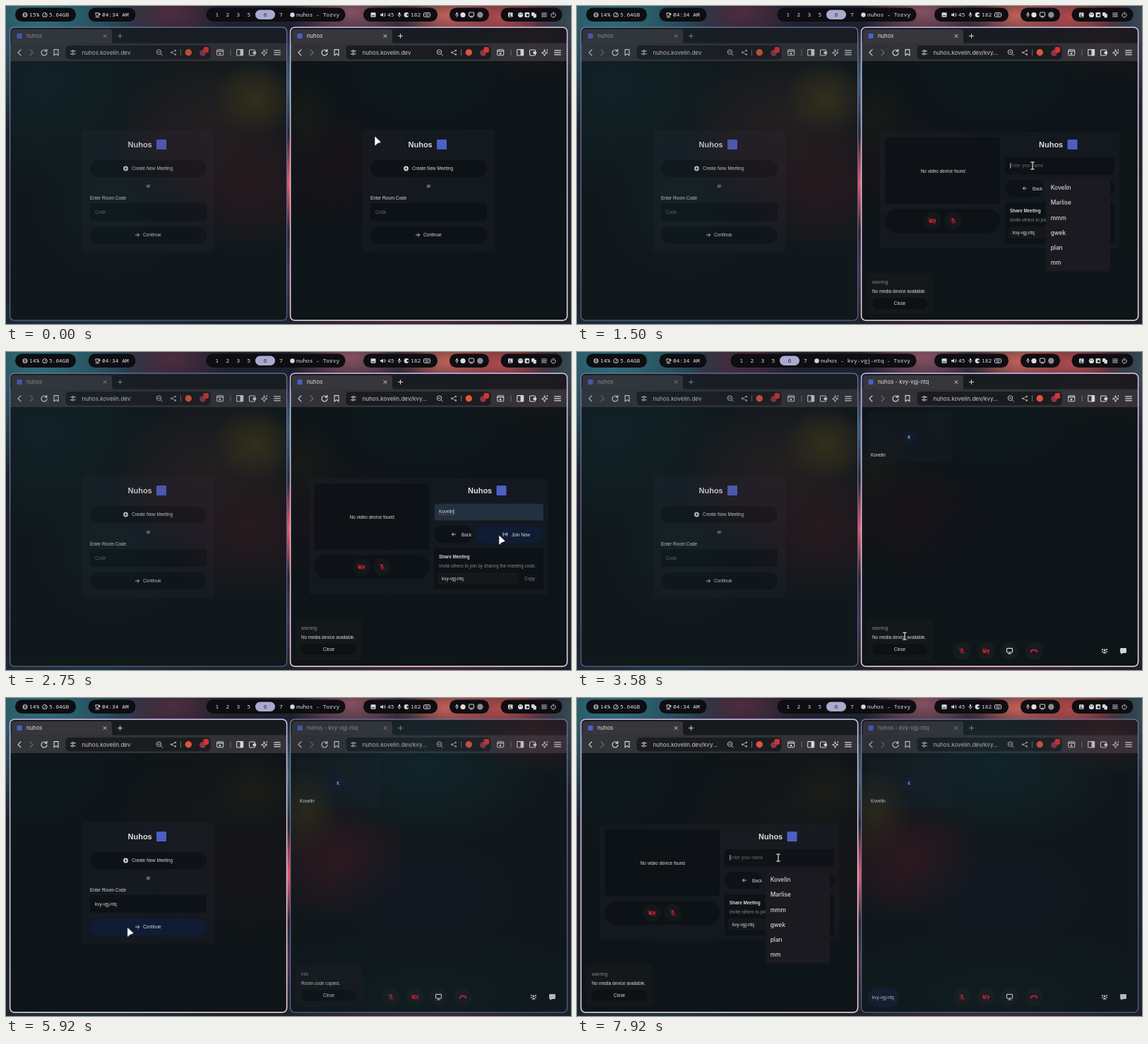
These frames come from a looping animation (800 by 450 pixels, 8 s). An HTML page:

```html
<!DOCTYPE html>
<html lang="en">
<head>
<meta charset="utf-8">
<title>Two windows, one meeting</title>
<style>
html, body { margin: 0; width: 100%; height: 100%; overflow: hidden; background: #10161c; }
svg { display: block; width: 100vw; height: 100vh; }
text { white-space: pre; }
.mono { font: 500 7.85px "Noto Sans Mono", "DejaVu Sans Mono", monospace; fill: #e4e4ea; }
.tab { font: 400 7.7px Inter, sans-serif; fill: #e0e1e4; }
.url { font: 400 8.1px Inter, sans-serif; fill: #c9cbcf; }
.list { font: 500 8.3px Inter, sans-serif; fill: #d4d4d9; }
.page { font: 400 6.38px "Liberation Sans", Arial, sans-serif; fill: #d9dbdd; }
.soft { fill: #85898d; }
.faint { fill: #686c70; }
.bold { font-weight: 700; }
.brand { font: 700 11px "Liberation Sans", Arial, sans-serif; fill: #dcdde0; }
.mid { text-anchor: middle; }
</style>
</head>
<body>
<svg id="stage" viewBox="0 0 800 450" preserveAspectRatio="none"></svg>
<script>
const LOOP = 8000;
const APP = 'Nuhos', HOST = 'nuhos.kovelin.dev', USER = 'Kovelin', ROOM = 'kvy-vgj-ntq';
const NAMES = [USER, 'Marlise', 'mmm', 'gwek', 'plan', 'mm'];
const WHITE = '#d6d7da', RED = '#c3202f', BLUE = '#4c5fc4', NAVY = '#101c34';
const DARK = 'rgba(9,13,15,.55)', CARD = 'rgba(30,33,40,.45)';

const rect = (x, y, w, h, r, fill, more = '') =>
  `<rect x="${x}" y="${y}" width="${w}" height="${h}" rx="${r}" fill="${fill}" ${more}/>`;
const dot = (x, y, r, fill, more = '') => `<circle cx="${x}" cy="${y}" r="${r}" fill="${fill}" ${more}/>`;
const text = (x, y, s, cls, more = '') => `<text x="${x}" y="${y}" class="${cls}" ${more}>${s}</text>`;
const group = (id, body) => `<g id="${id}">${body}</g>`;
const line = (x, y, d, color = WHITE, w = 1) =>
  `<path transform="translate(${x} ${y})" d="${d}" fill="none" stroke="${color}" stroke-width="${w}" stroke-linecap="round" stroke-linejoin="round"/>`;
const solid = (x, y, d, color = WHITE) => `<path transform="translate(${x} ${y})" d="${d}" fill="${color}"/>`;

let glowCount = 0;
const glow = ([x, y, rx, ry, color, alpha = 1]) => {
  const id = 'glow' + glowCount++;
  return `<radialGradient id="${id}"><stop stop-color="${color}" stop-opacity="${alpha}"/>
    <stop offset=".5" stop-color="${color}" stop-opacity="${alpha * .55}"/>
    <stop offset="1" stop-color="${color}" stop-opacity="0"/></radialGradient>
    <ellipse cx="${x}" cy="${y}" rx="${rx}" ry="${ry}" fill="url(#${id})"/>`;
};

// Icons
const micOff = (x, y) => line(x, y, 'M0-2.6v2', RED, 2.6) +
  line(x, y, 'M-2.7 0a2.7 2.5 0 0 0 5.4 0M0 2.6v1.4M-4-4L4 4', RED, .9);
const camOff = (x, y) => rect(x - 4.5, y - 2.7, 6, 5.4, 1, RED) + solid(x, y, 'M2-1L4.8-2.7V2.7L2 1Z', RED) +
  line(x, y, 'M-4.5-4L4.5 4', '#40151b', 1.2) + line(x, y, 'M-5-3.6L4 4.4', RED, .8);
const screen = (x, y) => rect(x - 4, y - 3.6, 8, 5.6, .8, 'none', `stroke="${WHITE}" stroke-width="1.2"`) +
  line(x, y, 'M0 2v2M-2 4h4', WHITE, 1.1);
const hangUp = (x, y) => line(x, y, 'M-4 1.4V0Q0-2.6 4 0V1.4', RED, 2.2);
const people = (x, y) => dot(x, y - 1, 1.4, WHITE) + dot(x - 3, y - 2, 1.1, WHITE) + dot(x + 3, y - 2, 1.1, WHITE) +
  solid(x, y, 'M-2.6 3.5Q0-1 2.6 3.5ZM-4.6 1.6Q-3-1-1.6.6L-2.6 1.8ZM4.6 1.6Q3-1 1.6.6L2.6 1.8Z');
const chat = (x, y) => solid(x, y, 'M-3.4-4H3.4Q4.4-4 4.4-3V2Q4.4 3 3.4 3H-.5L-3 5V3H-3.4Q-4.4 3-4.4 2V-3Q-4.4-4-3.4-4Z');
const arrow = (x, y, dir) => line(x, y, `M${-2.6 * dir} 0H${2.6 * dir}M${.4 * dir}-2.2L${2.6 * dir} 0L${.4 * dir} 2.2`, WHITE, .9);

const brand = x => text(x, 200, APP, 'brand') + rect(x + 40.5, 189, 14, 14, 1, BLUE);

function topBar() {
  const pill = (x, w) => rect(x, 2.5, w, 19.5, 9.7, '#0d0d12');
  const label = (x, s, id) => text(x, 15.3, s, 'mono', id ? `id="${id}"` : '');
  const center = (id, dx, title) => group(id,
    pill(283.5 + dx, 197 - dx) +
    [1, 2, 3, 5].map((n, i) => label(296.5 + dx + i * 15, n)).join('') +
    rect(353 + dx, 5.5, 28, 13.5, 6.7, '#aaa9cf') +
    text(364.7 + dx, 15.3, 6, 'mono', 'style="fill:#20202c"') +
    label(387 + dx, 7) + dot(405.5 + dx, 12.5, 3.2, WHITE) + label(411 + dx, title));
  return [[13, 86], [116.5, 67], [506, 105], [628, 56], [700.5, 87]].map(p => pill(...p)).join('') +
    dot(27, 12.5, 2.8, 'none', `stroke="${WHITE}" stroke-width="1.1"`) + line(27, 12.5, 'M-1-.6V.6M1-.6V.6') +
    label(33, '15%', 'cpuHigh') + label(33, '14%', 'cpuLow') +
    line(55, 12.5, 'M-2.6 2.4A3.3 3.3 0 1 1 2.6 2.4ZM0 .6L1.5-1.2') + label(61, '5.64GB') +
    line(130, 12.5, 'M-2.8-2.6H1.4V.5Q1.2 1.6 0 1.6H-1.6Q-2.8 1.6-2.8.5ZM1.6-1.8H3V0H1.6M-3 3.3H2') + label(136, '04:34 AM') +
    center('barShort', 0, 'nuhos - Torvy') + center('barLong', -66, `nuhos - ${ROOM} - Torvy`) +
    rect(516.5, 9.3, 7, 6.4, 1, WHITE) + line(520, 12.8, 'M-1.8 1H1.8', '#15151b') +
    solid(533, 12.5, 'M-3-1.2H-1.2L1-3V3L-1.2 1.2H-3Z') + line(534, 12.5, 'M1.5-1.5Q2.8 0 1.5 1.5M2.5-2.4Q4.4 0 2.5 2.4', WHITE, .7) +
    label(540, 45) + line(557, 12, 'M0-2v1.6', WHITE, 2.2) + line(557, 12, 'M-2.2 0a2.2 2.2 0 0 0 4.4 0M0 2.2v1.4', WHITE, .8) +
    dot(567, 12.5, 3.4, WHITE) + rect(567.5, 11.3, 3, 2.4, 0, '#0d0d12') + label(573, 182) +
    rect(591.5, 9.7, 9, 5.6, 1, 'none', `stroke="${WHITE}"`) + line(596, 12.5, 'M-2.6-.7H2.6M-1.6 1.2H1.6', WHITE, .8) +
    line(638.5, 12, 'M0-2v1.6', WHITE, 2) + line(638.5, 12, 'M-2 0a2 2 0 0 0 4 0M0 2.2v1.2', WHITE, .8) +
    dot(647, 12.5, 3.6, '#e5d8dc') + rect(655.5, 9, 7, 5.6, .6, 'none', `stroke="${WHITE}"`) + line(659, 16, 'M-1.5 0h3') +
    dot(671.3, 12.5, 4.2, '#8c8a90') +
    rect(711, 9.3, 6.5, 6.5, 1, WHITE) + line(714.3, 12.5, 'M0-2L-1.5 2H1.5', '#15151b', .9) +
    dot(728.5, 12.5, 3.6, WHITE) + dot(727.3, 11.4, .7, '#15151b') + dot(729.8, 11.4, .7, '#15151b') +
    rect(734.5, 9, 6.6, 7, 1, WHITE) + rect(737, 11.5, 3, 3, 0, '#15151b') +
    rect(744, 9, 4.5, 5, .8, WHITE) + rect(746.4, 11, 4.5, 5.4, .8, WHITE) +
    line(762, 12.5, 'M-3.4-2.4H3.4M-3.4 0H3.4M-3.4 2.4H3.4') +
    line(775, 12.5, 'M-1.8-2.4A3.2 3.2 0 1 0 1.8-2.4M0-3.6V-.4');
}

function chrome(side) {
  const y = 65.8, bar = x => line(x, y, 'M0-4v8', '#77787c', .9);
  return rect(5, 30, 393, 24, 0, '#17191d', 'opacity=".9"') +
    solid(0, 0, 'M5 53Q8 53 8 49V37Q8 33 12 33H146Q150 33 150 37V49Q150 53 153 53Z', '#36363b') +
    rect(5, 52.5, 393, 25.5, 0, '#333338', 'opacity=".94"') +
    rect(84.5, 56, 205, 19.5, 5, '#1b1c20') + rect(15.6, 39, 7, 7, .6, BLUE) +
    group(side + 'Title', text(29, 45.2, 'nuhos', 'tab', `id="${side}TabShort"`) +
      text(29, 45.2, 'nuhos - ' + ROOM, 'tab', `id="${side}TabLong"`) +
      line(140, 42.5, 'M-2-2L2 2M2-2L-2 2') + line(161.5, 42.5, 'M-3 0H3M0-3V3')) +
    line(19, y, 'M2-4L-2 0L2 4', WHITE, 1.2) + line(36, y, 'M-2-4L2 0L-2 4', '#707176', 1.2) +
    line(54, y, 'M3.4-2A4 4 0 1 0 4 .8M3.8-4.4V-1.6H1', WHITE, 1.2) + line(71, y, 'M-3-4.2H3V4.2L0 1.8L-3 4.2Z', WHITE, 1.1) +
    line(95, y, 'M-3.5-2H-1M1.6-2H3.5M-3.5 2H-2M1 2H3.5', WHITE, .9) + dot(95, y - 2, 1.3, 'none', `stroke="${WHITE}"`) +
    dot(94.3, y + 2, 1.3, 'none', `stroke="${WHITE}"`) +
    text(107.5, 68.8, HOST, 'url', `id="${side}UrlShort"`) + text(107.5, 68.8, HOST + '/kvy...', 'url', `id="${side}UrlLong"`) +
    dot(216.5, y - .6, 3.3, 'none', 'stroke="#bfc0c4"') + line(217, y, 'M2 2L4.4 4.4M-2-.6H1', '#bfc0c4') +
    line(237, y, 'M2.8-2.8L-2.8 0L2.8 2.8', '#a5a6aa', .9) + dot(239.8, 63, 1.3, '#a5a6aa') + dot(234.2, y, 1.3, '#a5a6aa') +
    dot(239.8, 68.6, 1.3, '#a5a6aa') + bar(247.5) + dot(258.3, y, 4.7, '#e0553a') +
    dot(278.5, 66.5, 4.4, '#8e3350') + rect(279.5, 58, 7.5, 8, 2, '#d2362f') +
    rect(298.7, 61.8, 9, 8, .8, 'none', `stroke="${WHITE}"`) + line(303, y, 'M-4-2H4', WHITE, 1.2) + dot(303, 67.2, 1.3, WHITE) + bar(318) +
    rect(326.7, 61.6, 9, 8.4, .8, 'none', `stroke="${WHITE}" stroke-width="1.1"`) + rect(331.5, 62, 4, 8, 0, WHITE) +
    rect(344.5, 62, 8, 8, 1.2, 'none', `stroke="${WHITE}" stroke-width="1.1"`) + rect(349.5, 64.5, 4.6, 3.4, .8, WHITE) +
    line(366, y, 'M-.5-4L.6-.6L4 .5L.6 1.6L-.5 5L-1.6 1.6L-4.6.5L-1.6-.6ZM3.3-4.4v2.2', WHITE, 1) +
    line(384, y, 'M-4.4-3H4.4M-4.4 0H4.4M-4.4 3H4.4', WHITE, 1.2);
}

const home = side => group(side + 'Home',
  rect(108, 175, 187, 172, 3, CARD) + brand(172.5) +
  rect(119, 218, 165, 24, 12, DARK) + rect(119, 218, 165, 24, 12, NAVY, `id="${side}CreateHot"`) +
  dot(169.5, 230, 3.4, WHITE) + line(169.5, 230, 'M-1.4 0H1.4M0-1.4V1.4', '#14181b', .9) +
  text(178, 232.4, 'Create New Meeting', 'page') + text(201.5, 256.5, 'or', 'page mid') +
  text(119, 273.6, 'Enter Room Code', 'page') + rect(119, 279, 165, 25, 3, DARK) +
  text(126, 293.8, 'Code', 'page faint', `id="${side}CodeHint"`) + text(126, 293.8, ROOM, 'page', `id="${side}Code"`) +
  rect(119, 312, 165, 24, 12, DARK) + rect(119, 312, 165, 24, 12, NAVY, `id="${side}GoHot"`) +
  arrow(186, 324, 1) + text(194, 326.4, 'Continue', 'page'));

const lobby = side => group(side + 'Lobby',
  rect(32, 179, 339, 164, 3, CARD) + rect(39.5, 186, 162.5, 94, 4, DARK) +
  text(121.3, 235.6, 'No video device found', 'page mid') + rect(39.5, 287, 162.5, 34, 17, DARK) +
  dot(106, 304, 12.5, '#14181b') + dot(135.5, 304, 12.5, '#14181b') + camOff(106, 304) + micOff(135.5, 304) +
  brand(257) + rect(209, 214, 155, 24.5, 3, DARK) +
  text(216, 228.2, 'Enter your name', 'page faint', `id="${side}NameHint"`) +
  group(side + 'Name', rect(209.5, 214.5, 154.5, 24, 3, '#223140') + text(216, 228.2, USER, 'page') +
    line(216, 230, 'M0 0H20', '#b23a45', .7) + line(237, 226, 'M0-3.5V3.5', WHITE, .7)) +
  group(side + 'Caret', line(216.6, 226, 'M0-3.5V3.5', WHITE, .7)) +
  rect(209, 246, 54, 24, 12, DARK) + arrow(237, 258, -1) + text(248, 260.5, 'Back', 'page') +
  rect(267, 246, 97, 24, 12, DARK) + rect(267, 246, 97, 24, 12, NAVY, `id="${side}JoinHot"`) +
  line(310, 258, 'M-3-2.6V2.6M0-1.5L1.6 0L0 1.5M-3 0H1.4M2.4-2.6Q4 0 2.4 2.6', WHITE, .8) + text(318.7, 260.5, 'Join Now', 'page') +
  rect(209, 278, 155, 58, 3, DARK) + text(216, 292.3, 'Share Meeting', 'page bold') +
  text(216, 305.2, 'Invite others to join by sharing the meeting code:', 'page soft') +
  rect(214, 312, 115, 17, 3, '#14181b') + text(220, 322.7, ROOM, 'page') + text(337, 322.7, 'Copy', 'page soft') +
  group(side + 'List', rect(266.5, 245, 91.5, 130.5, 3, '#1b1a20') +
    group(side + 'Pick', rect(269.5, 248, 85.5, 20, 4, '#35353b') + line(344.5, 258, 'M-2-2L2 2M2-2L-2 2')) +
    NAMES.map((n, i) => text(273.7, 260.3 + i * 21.1, n, 'list')).join('')));

const room = side => group(side + 'Room',
  rect(13.5, 85, 120, 71, 3, '#151b20', 'opacity=".75"') + dot(73.5, 121, 9.8, '#101b2e') +
  text(73.5, 123.2, USER[0], 'page mid') + text(19, 148, USER, 'page') +
  rect(14, 410, 45, 27, 13.5, '#12171b') + rect(14, 410, 45, 27, 13.5, '#111c30', `id="${side}CodeHot"`) +
  text(36.5, 425.5, ROOM, 'page mid') +
  [148, 182, 215.5, 250].map(x => dot(x, 423, 13, '#161b1f')).join('') +
  micOff(148, 423) + camOff(182, 423) + screen(215.5, 423) + hangUp(250, 423) + people(350, 423) + chat(376.5, 423));

const toast = (id, kind, message) => group(id,
  rect(13, 378, 94, 58, 3, '#14181b') + text(21, 393, kind, 'page soft') + text(21, 406, message, 'page') +
  rect(21, 413, 78, 16, 8, '#0d1113') + text(60, 423.2, 'Close', 'page mid'));

const browser = (side, dx, glows) => `<g transform="translate(${dx} 0)"><g clip-path="url(#frame)">
  ${rect(5, 30, 393, 416, 0, '#1f2b33')}${glows.map(glow).join('')}
  <g id="${side}Body">${rect(5, 78, 393, 368, 0, '#0e1316', 'opacity=".91"')}
  ${chrome(side)}${home(side)}${lobby(side)}${room(side)}
  ${toast(side + 'Warn', 'warning', 'No media device available.')}${toast(side + 'Info', 'info', 'Room code copied.')}</g></g>
  ${rect(5.6, 30.2, 392, 414.6, 6, 'none', 'stroke="url(#edgeIdle)" stroke-width="1.3"')}
  ${rect(5.6, 30.2, 392, 414.6, 6, 'none', `id="${side}Edge" stroke="url(#edgeLive)" stroke-width="1.5"`)}</g>`;

const edge = (id, a, b) => `<linearGradient id="${id}" x2=".3" y2="1"><stop stop-color="${a}"/><stop offset="1" stop-color="${b}"/></linearGradient>`;

document.getElementById('stage').innerHTML =
  `<defs><clipPath id="frame">${rect(5.6, 30.2, 392, 414.6, 6, '#000')}</clipPath>
  ${edge('edgeIdle', '#7d76a8', '#555f84')}${edge('edgeLive', '#c9aee6', '#efd3cf')}</defs>` +
  rect(0, 0, 800, 450, 0, '#1b222d') +
  [[50, 10, 190, 170, '#2f6f7c'], [235, 10, 80, 50, '#4e2c40'], [490, 8, 90, 50, '#85505f'], [625, 14, 75, 40, '#c4645a'],
    [700, 16, 90, 50, '#b04a4c'], [800, 20, 50, 120, '#3a4c56'], [400, 250, 20, 72, '#f0586a'], [400, 110, 20, 80, '#35606c'],
    [400, 375, 20, 70, '#4a3050'], [580, 450, 200, 40, '#44283a'], [120, 450, 180, 40, '#1d3540']].map(glow).join('') +
  topBar() +
  browser('left', 0, [[50, 110, 190, 150, '#1f5560', .8], [290, 160, 140, 100, '#80504a', .75], [352, 132, 60, 55, '#a8842f'],
    [345, 250, 140, 100, '#82303c', .9], [150, 270, 110, 110, '#23505a', .6], [240, 205, 95, 70, '#6a3a42', .8]]) +
  browser('right', 397, [[195, 95, 170, 110, '#1e5863'], [28, 165, 50, 70, '#80702c'], [75, 230, 110, 85, '#93273f'],
    [200, 280, 140, 90, '#222b52', .8], [350, 50, 110, 60, '#7b3440', .9], [200, 420, 240, 90, '#1f434b', .6]]) +
  `<g id="cursor"><path id="pointer" d="M0 .4V11.6Q.3 13.4 1.8 12L3.8 9.7L8 8.6Q9.2 7.8 8.2 6.8L1.4.2Q.3-.6 0 .4Z" fill="#fff" stroke="#15181b" stroke-width=".6"/>
  <g id="beam">${line(0, 0, 'M-2.4-5H2.4M0-5V5M-2.4 5H2.4', '#0b0d0f', 2.2)}${line(0, 0, 'M-2.4-5H2.4M0-5V5M-2.4 5H2.4', '#fff', 1.1)}</g></g>`;

// Motion
const play = (id, frames) => document.getElementById(id).animate(frames, { duration: LOOP, iterations: Infinity });
const track = (id, ...points) => {
  const all = [[0, points[0][1]], ...points, [LOOP, points[points.length - 1][1]]];
  play(id, all.map(([t, opacity]) => ({ offset: t / LOOP, opacity })));
};
// Each span is [from, to, fade].
const show = (id, ...spans) => track(id, ...(spans.length ? spans : [[LOOP, LOOP]]).flatMap(([from, to, fade = 1]) => [
  ...(from > 0 ? [[from, 0], [Math.min(from + fade, LOOP), from < LOOP ? 1 : 0]] : [[0, 1]]),
  ...(to < LOOP ? [[to, 1], [to + fade, 0]] : [])]));

const schedule = {
  cpuHigh: [[0, 240]], cpuLow: [[240, LOOP]],
  barShort: [[0, 2900], [4500, LOOP]], barLong: [[2900, 4500]],
  leftEdge: [[4470, LOOP, 250]], rightEdge: [[0, 4470, 250]],
  leftTabShort: [[0, LOOP]], leftTabLong: [], rightTabShort: [[0, 2900]], rightTabLong: [[2900, LOOP]],
  leftUrlShort: [[0, 5980]], leftUrlLong: [[5980, LOOP]], rightUrlShort: [[0, 440]], rightUrlLong: [[440, LOOP]],
  leftHome: [[0, 5980, 80]], rightHome: [[0, 440, 80]],
  leftCreateHot: [], rightCreateHot: [[260, LOOP, 80]],
  leftGoHot: [[4900, 5110, 80], [5570, LOOP, 80]], rightGoHot: [],
  leftCodeHint: [[0, 5380]], leftCode: [[5380, LOOP]], rightCodeHint: [[0, LOOP]], rightCode: [],
  leftLobby: [[6860, LOOP, 160]], rightLobby: [[640, 2820, 120]],
  leftNameHint: [[0, LOOP]], leftName: [], rightNameHint: [[0, 2000]], rightName: [[2000, LOOP]],
  leftCaret: [[7500, LOOP]], rightCaret: [[1340, 2000]],
  leftJoinHot: [], rightJoinHot: [[2050, LOOP, 80]],
  leftList: [[7600, LOOP, 80]], leftPick: [], rightPick: [[1980, LOOP]],
  leftRoom: [], rightRoom: [[2900, LOOP, 120]], leftCodeHot: [], rightCodeHot: [[3780, LOOP, 80]],
  leftWarn: [[6660, LOOP, 200]], leftInfo: [], rightWarn: [[520, 3660, 200]], rightInfo: [[3960, 7600, 200]],
  pointer: [[0, 1250], [1850, 3480], [3640, 5130], [5500, 7250]],
  beam: [[1250, 1850], [3480, 3640], [5130, 5500], [7250, LOOP]]
};
for (const [id, spans] of Object.entries(schedule)) show(id, ...spans);

track('rightList', [1400, 0], [1440, 1], [2100, 1], [2350, 0]);
track('leftBody', [4470, .83], [4720, 1]);
track('rightBody', [4470, 1], [4720, .83]);
track('leftTitle', [4470, .6], [4720, 1]);
track('rightTitle', [4470, 1], [4720, .6]);

play('cursor', [
  [0, 522, 185], [90, 522, 185], [300, 598, 228], [850, 600, 228], [1330, 645, 226], [1720, 645, 226],
  [2050, 696, 259], [2880, 698, 260], [3580, 464, 402], [3780, 438, 421], [4300, 438, 421],
  [5000, 184, 313], [5190, 160, 291], [5420, 160, 291], [5640, 172, 325], [6750, 170, 327], [6950, 170, 327],
  [7400, 285, 226], [LOOP, 285, 226]
].map(([t, x, y]) => ({ offset: t / LOOP, transform: `translate(${x}px, ${y}px)`, easing: 'ease-in-out' })));
</script>
</body>
</html>
```
